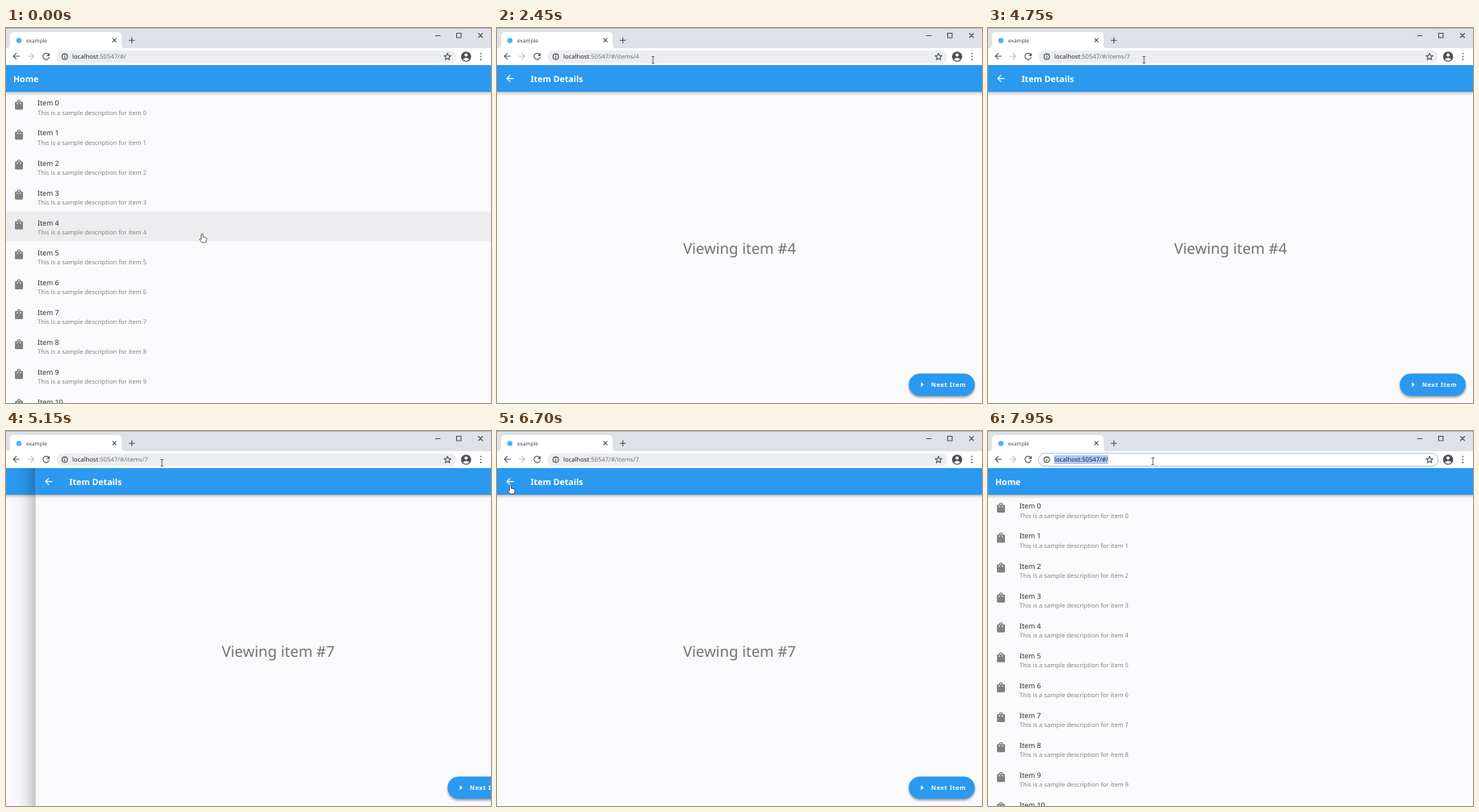
An HTML page that plays this animation: 600 by 465 pixels, repeating every 8000 ms.

```html
<!DOCTYPE html>
<html lang="en">
<head>
<meta charset="utf-8">
<title>example</title>
<style>
  html, body { margin: 0; width: 100%; height: 100%; overflow: hidden; background: #faf9fb; }
  svg { display: block; width: 100vw; height: 100vh; }
  text { font-family: "Noto Sans", "Open Sans", sans-serif; text-rendering: geometricPrecision; white-space: pre; }
  .bar { fill: #2a99ef; }
  .heading { font-size: 10.6px; font-weight: 600; fill: #fff; }
  .title { font-size: 8.75px; fill: #2c2c2c; }
  .subtitle { font-size: 7.6px; fill: #858585; }
  .big { font-size: 18.55px; fill: #737373; text-anchor: middle; }
  .action { font-size: 7.5px; font-weight: 700; letter-spacing: .6px; fill: #fff; }
  .address { font-size: 7.63px; }
  .line { fill: none; stroke: #4e5256; stroke-width: 1.1; }
  .cursor { fill: #fff; stroke: #333; stroke-width: .75; stroke-linejoin: round; }
</style>
</head>
<body>
<svg viewBox="0 0 600 465" preserveAspectRatio="none">
  <defs>
    <linearGradient id="drop" x2="0" y2="1">
      <stop stop-color="#000" stop-opacity=".28"/>
      <stop offset=".4" stop-color="#000" stop-opacity=".1"/>
      <stop offset="1" stop-color="#000" stop-opacity="0"/>
    </linearGradient>
    <linearGradient id="edge">
      <stop stop-opacity="0"/>
      <stop offset=".3" stop-opacity=".016"/>
      <stop offset=".6" stop-opacity=".07"/>
      <stop offset="1" stop-opacity=".22"/>
    </linearGradient>
    <filter id="soft" x="-20%" y="-50%" width="140%" height="200%"><feGaussianBlur stdDeviation="1.8"/></filter>
    <path id="bag" d="M18 6h-2a4 4 0 0 0-8 0H6a2 2 0 0 0-2 2v12a2 2 0 0 0 2 2h12a2 2 0 0 0 2-2V8a2 2 0 0 0-2-2zm-8 4a1 1 0 0 1-2 0V8h2zm2-6a2 2 0 0 1 2 2h-4a2 2 0 0 1 2-2zm4 6a1 1 0 0 1-2 0V8h2z"/>
    <path id="back" d="M20 11H7.83l5.59-5.59L12 4l-8 8 8 8 1.41-1.41L7.83 13H20z"/>
  </defs>

  <g id="pages"></g>

  <g id="browser">
    <rect width="600" height="46" fill="#fff"/>
    <rect width="600" height="25" fill="#dee1e6"/>
    <rect width="600" height=".8" fill="#a5a8ad"/>
    <path d="M0 25.5q5 0 5-5V10q0-5 5-5H138q5 0 5 5V20.500q0 5 5 5z" fill="#fff"/>
    <circle cx="16" cy="15.500" r="3.2" fill="#45b8f2"/>
    <text x="25" y="17.800" font-size="6.5" fill="#45484c">example</text>
    <path class="line" d="M131.700 12.700l4.800 4.800m0-4.800l-4.800 4.800M152 15.200h7.400M155.700 11.500v7.400"/>
    <path class="line" stroke-width="1" d="M531 9.500h6.500M557.500 6.500h5.500v5.500h-5.500zM584.300 6.500l5.500 5.500m0-5.500l-5.500 5.500"/>
    <use href="#back" transform="translate(6.200 28.700) scale(.53)" fill="#505459"/>
    <use href="#back" transform="translate(37.300 28.700) scale(-.53 .53)" fill="#bcbfc3"/>
    <path class="line" d="M52.600 32.600A3.900 3.900 0 1 0 53.500 36"/>
    <path d="M54 30.700v4h-4z" fill="#505459"/>
    <rect id="field" x="62.500" y="27.700" width="494.500" height="15.800" rx="7.900"/>
    <circle class="line" cx="72.700" cy="35.500" r="3.400" stroke-width=".9"/>
    <path class="line" d="M72.700 35v2.400M72.700 33.200v1"/>
    <rect id="selection" x="82" y="30" height="11" fill="#abcaf5"/>
    <text class="address" x="82" y="38.300"><tspan fill="#25282b">localhost</tspan><tspan id="path"></tspan></text>
    <rect id="caret" y="30.500" width=".8" height="10" fill="#333"/>
    <path class="line" stroke-linejoin="round" d="M546.200 31.300l1.200 2.800 3 .3-2.300 2 .7 3-2.600-1.600-2.600 1.600.7-3-2.300-2 3-.3z"/>
    <circle cx="569.200" cy="35.500" r="6.300" fill="#4c5054"/>
    <circle cx="569.200" cy="33.400" r="2" fill="#fff"/>
    <path d="M565.200 38.700q4-3.400 8 0q-4 4-8 0z" fill="#fff"/>
    <g fill="#505459"><circle cx="587.500" cy="31.600" r=".9"/><circle cx="587.500" cy="35.300" r=".9"/><circle cx="587.500" cy="39" r=".9"/></g>
  </g>

  <g id="pointer">
    <path id="arrow" class="cursor" d="M0 0V8.800L2 7l1.400 3 1.300-.6L3.300 6.500H6z"/>
    <path id="hand" class="cursor" transform="translate(2.500)" d="M-1 7V1a1 1 0 0 1 2 0V4.200q3 .1 4.200 1q.8.600.4 2L4.700 11H0L-2.900 7.600q-.2-1.300 1.100-.9z"/>
    <path id="beam" class="cursor" d="M-1.700-4H1.700M0-4V4M-1.700 4H1.700"/>
  </g>
</svg>

<script>
const LOOP = 8000, SLIDE = 600, WIDTH = 600, ROW = 37.1;
const PUSH_FIRST = 850, PUSH_SECOND = 4825, POP = 6800;
const $ = id => document.getElementById(id);

const addresses = [[0, '/'], [PUSH_FIRST, '/items/4'], [4250, '/items/'], [4350, '/items/7'], [POP, '/']];
const moves = [
  { start: 1800, end: 2400, from: [240, 255], to: [193, 39.5] },
  { start: 5500, end: 6400, from: [193, 39.5], to: [14, 67] },
  { start: 7150, end: 7600, from: [14, 67], to: [204, 37.5] }
];
const rowTint = [[0, .05], [850, .05], [920, .08], [1100, .027], [1250, 0], [LOOP, 0]];

function page(id, content) {
  return `<g id="${id}">
    <rect x="-30" y="46" width="30" height="419" fill="url(#edge)"/>
    <rect y="46" width="600" height="419" fill="#faf9fb"/>
    ${content}
    <rect y="79" width="600" height="5" fill="url(#drop)"/>
    <rect class="bar" y="46" width="600" height="33"/>`;
}

function homePage() {
  const rows = Array.from({ length: 11 }, (_, i) => `<g transform="translate(0 ${79 + i * ROW})">
    <use href="#bag" transform="translate(8.600 8.700) scale(.62)" fill="#808080"/>
    <text class="title" x="39" y="17.400">Item ${i}</text>
    <text class="subtitle" x="39" y="28.600">This is a sample description for item ${i}</text></g>`);
  const tint = `<rect id="tint" y="${79 + 4 * ROW}" width="600" height="${ROW}"/>`;
  return page('home', tint + rows.join('')) + '<text class="heading" x="9" y="67">Home</text></g>';
}

function detailPage(n) {
  return page('item' + n, `<text class="big" x="300" y="279.700">Viewing item #${n}</text>
    <rect x="509.500" y="430.500" width="81.500" height="27.500" rx="13.700" opacity=".4" filter="url(#soft)"/>
    <rect class="bar" x="509.500" y="428.500" width="81.500" height="27.500" rx="13.700"/>
    <path d="M524.500 439.300l3.500 3-3.500 3z" fill="#fff"/>
    <text class="action" x="537" y="445">Next Item</text>`) +
    `<use href="#back" transform="translate(9 55.600) scale(.58)" fill="#fff"/>
    <text class="heading" x="41.500" y="66.700">Item Details</text></g>`;
}

const clamp = v => Math.min(1, Math.max(0, v));
const cubic = (a, b, s) => 3 * a * s * (1 - s) ** 2 + 3 * b * s * s * (1 - s) + s ** 3;

// cubic-bezier(.35, .91, .33, .97), solved by bisection
function slide(t, start) {
  const p = clamp((t - start) / SLIDE);
  if (p === 0 || p === 1) return p;
  let low = 0, high = 1;
  for (let i = 0; i < 24; i++) {
    const mid = (low + high) / 2;
    if (cubic(.35, .33, mid) < p) low = mid; else high = mid;
  }
  return cubic(.91, .97, low);
}

function interpolate(steps, t) {
  const i = steps.findIndex(([time]) => time > t);
  const [t0, v0] = steps[i - 1], [t1, v1] = steps[i];
  return v0 + (v1 - v0) * (t - t0) / (t1 - t0);
}

function pointerAt(t) {
  const move = moves.filter(m => m.start <= t).pop() || moves[0];
  const p = clamp((t - move.start) / (move.end - move.start));
  const eased = p * p * (3 - 2 * p);
  return move.from.map((v, i) => v + (move.to[i] - v) * eased);
}

const show = (id, on) => $(id).setAttribute('visibility', on ? 'visible' : 'hidden');
const place = (id, x, y = 0) => $(id).setAttribute('transform', `translate(${x} ${y})`);

function drawPages(t) {
  const first = slide(t, PUSH_FIRST), second = slide(t, PUSH_SECOND), pop = slide(t, POP);
  place('home', -WIDTH / 3 * (first - pop));
  place('item4', WIDTH * (1 - first) - WIDTH / 3 * second);
  place('item7', WIDTH * (1 - second + pop));
  show('item4', first > 0 && second < 1);
  show('item7', second > 0 && pop < 1);
  $('tint').setAttribute('opacity', interpolate(rowTint, t));
}

function drawAddress(t) {
  const focused = (t >= 2800 && t < 4600) || t >= 7850;
  const selected = focused && (t < 3800 || t >= 7850);
  const path = $('path');
  path.textContent = ':50547/#' + addresses.filter(([time]) => time <= t).pop()[1];
  path.setAttribute('fill', selected ? '#25282b' : '#707477');
  const width = path.parentNode.getComputedTextLength();
  $('selection').setAttribute('width', width);
  $('caret').setAttribute('x', 82.3 + width);
  $('field').setAttribute('fill', focused ? '#fff' : '#ebedf0');
  $('field').setAttribute('stroke', focused ? '#9dbff0' : 'none');
  show('selection', selected);
  show('caret', focused && !selected);
}

function drawPointer(t) {
  const [x, y] = pointerAt(t);
  const overLink = t < 900 || (t >= 6300 && t < POP + 50);
  const kind = overLink ? 'hand' : y < 46 ? 'beam' : 'arrow';
  place('pointer', x, y);
  for (const id of ['arrow', 'hand', 'beam']) show(id, id === kind);
}

$('pages').innerHTML = homePage() + detailPage(4) + detailPage(7);
const begin = performance.now();

function draw() {
  const t = (performance.now() - begin) % LOOP;
  drawPages(t);
  drawAddress(t);
  drawPointer(t);
  requestAnimationFrame(draw);
}
draw();
</script>
</body>
</html>
```
